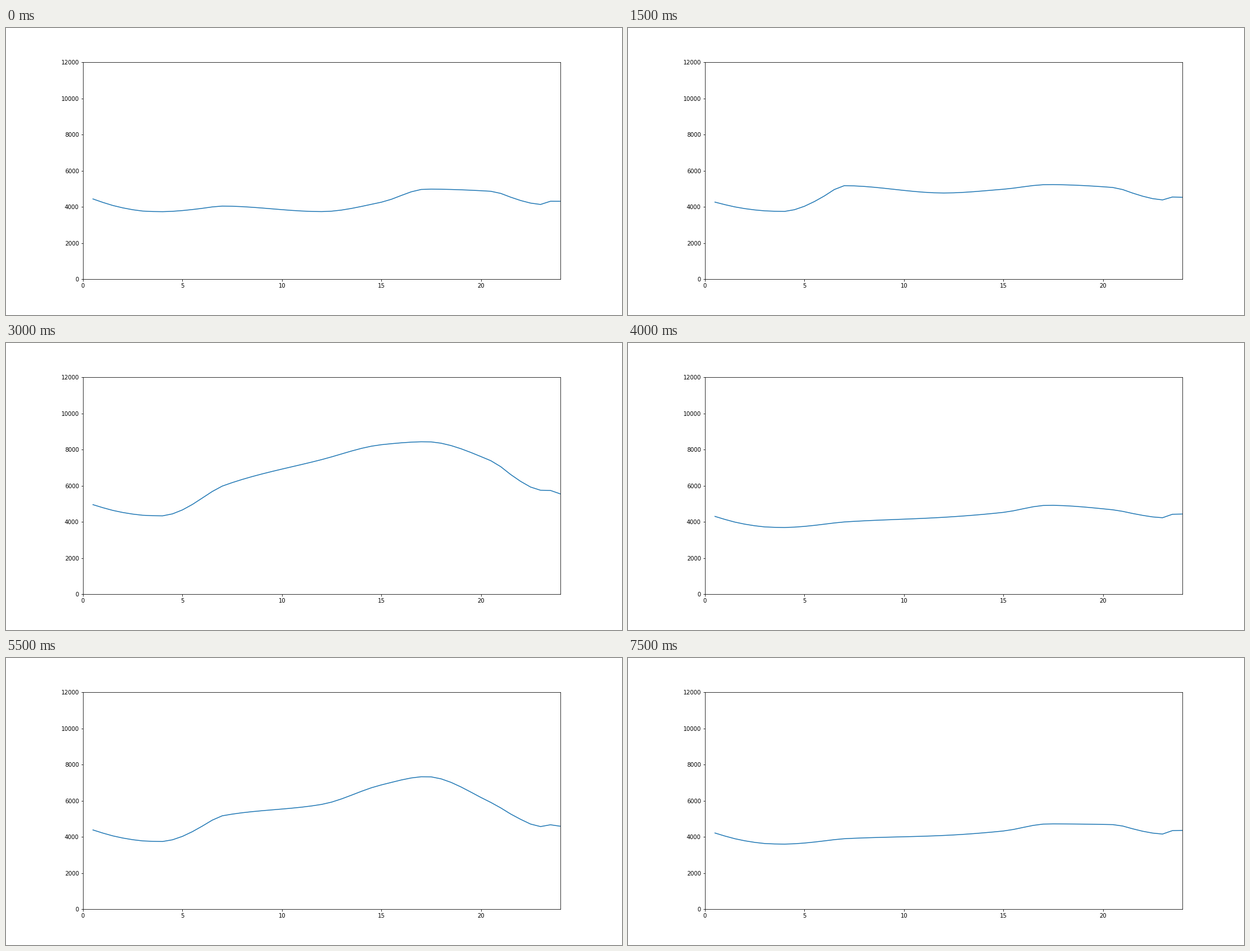
Animation, 1080 px wide and 504 px high, one loop 8000 ms. Source, as a matplotlib script:

```python
import numpy as np
import matplotlib.pyplot as plt
from matplotlib.animation import FuncAnimation

HOURS = np.arange(1, 49) / 2
KNOTS = np.array([0.5, 2, 3.2, 4, 5, 6, 7, 12, 15, 17.25, 20.5, 22, 23, 23.5, 24])


def smooth(x, xk, yk):
    """Monotone cubic interpolation through the knots."""
    h = np.diff(xk)
    d = np.diff(yk) / h
    a, b = d[:-1], d[1:]
    same = a * b > 0
    inner = np.where(same, 2 * a * b / np.where(same, a + b, 1), 0)
    m = np.concatenate([[1.2 * d[0]], inner, [d[-1]]])
    i = np.clip(np.searchsorted(xk, x, side="right") - 1, 0, len(h) - 1)
    t = (x - xk[i]) / h[i]
    return ((1 + 2 * t) * (1 - t) ** 2 * yk[i] + t * t * (3 - 2 * t) * yk[i + 1]
            + h[i] * t * (1 - t) * ((1 - t) * m[i] - t * m[i + 1]))


def day_load(start, weekend, night, noon, peak, evening, end):
    """Half-hourly load built from a few key levels of the day."""
    rise = night * (0.083 if weekend else 0.38)
    # the hotter the day, the earlier the afternoon climbs
    climb = 0.42 + 0.12 * (peak - 5000) / 1000
    late = end - 200 + 0.15 * (evening - 4700)
    levels = [
        start, night + 0.3 * (start - night), night + 20, night,
        night + 0.2 * rise, night + 0.6 * rise, night + rise,
        noon, noon + climb * (peak - noon), peak,
        evening, late + 0.3 * (evening - late), late, (late + end) / 2 + 90, end,
    ]
    return smooth(HOURS, KNOTS, np.array(levels, float))


# night, noon, peak, evening and midnight levels, Saturday first
KEYS = [
    (3735, 3740, 4985, 4865, 4310),
    (3350, 3600, 4850, 4700, 4150),
    (3540, 4600, 5045, 4850, 4415),
    (3750, 4770, 5235, 5075, 4530),
    (3840, 5200, 5680, 5200, 4700),
    (3825, 5900, 7760, 6450, 5105),
    (4335, 7450, 8440, 7390, 5550),
    (4300, 4900, 5870, 5500, 4455),
    (3690, 4255, 4920, 4670, 4435),
    (3680, 4950, 5240, 5000, 4500),
    (3695, 5250, 5775, 5250, 4535),
    (3745, 5800, 7340, 5910, 4590),
    (3760, 5150, 5550, 5000, 4300),
    (3625, 4860, 5150, 4770, 4460),
    (3650, 3950, 4760, 4700, 4365),
    (3600, 4080, 4720, 4680, 4360),
]

days = []
start = 4440
for n, keys in enumerate(KEYS):
    days.append(day_load(start, n % 7 < 2, *keys))
    start = keys[-1] - 150

fig, ax = plt.subplots(figsize=(15, 7), dpi=72)
fig.subplots_adjust(left=0.125, right=0.9, bottom=0.125, top=0.88)
ax.set_xlim(0, 24)
ax.set_ylim(0, 12000)
line, = ax.plot(HOURS, days[0], color="#1f77b4", lw=1.5)


def draw(i):
    line.set_ydata(days[i])
    return line,


anim = FuncAnimation(fig, draw, frames=len(days), interval=500,
                     repeat=True, repeat_delay=0)
plt.show()
```
